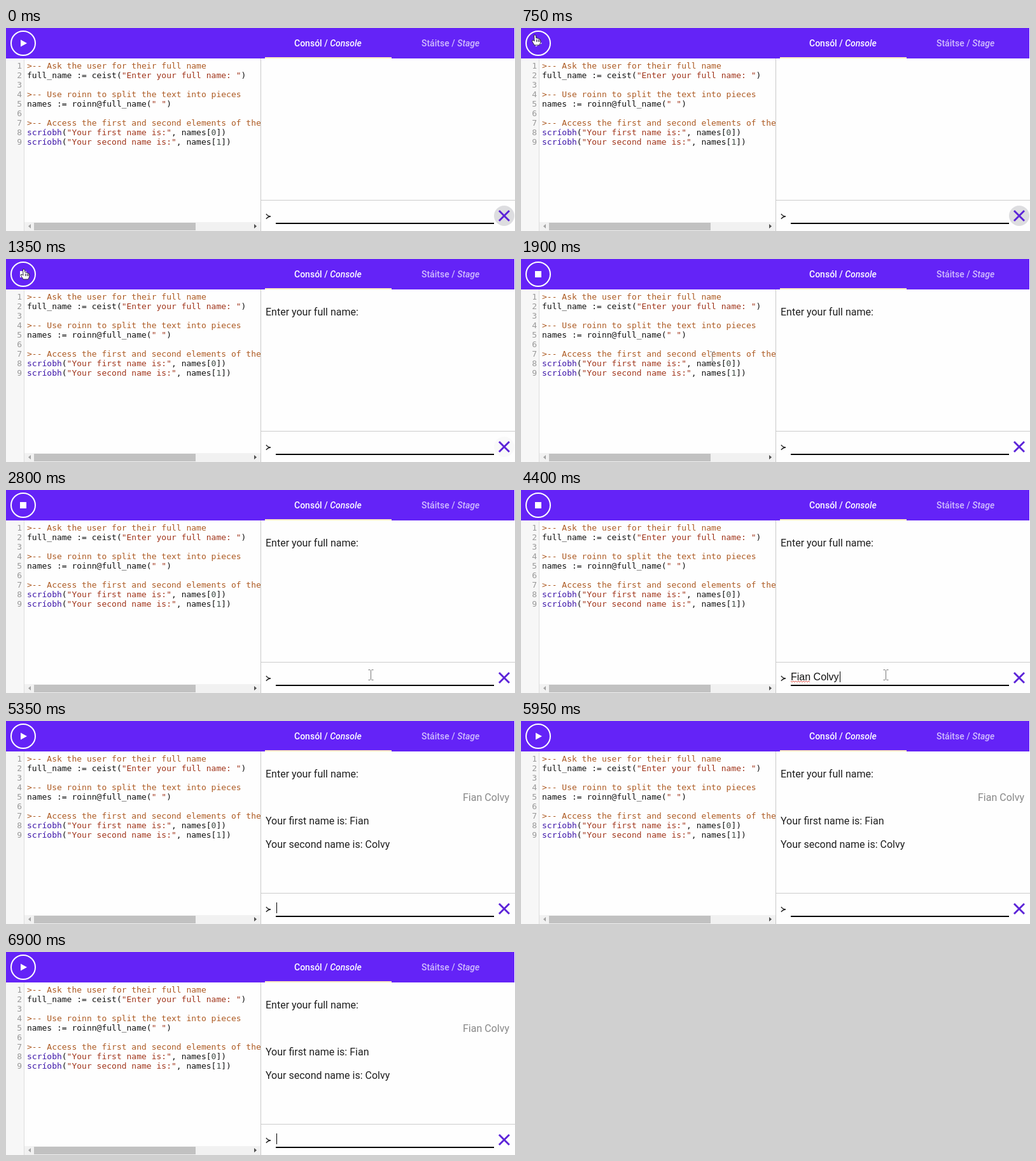
An HTML page with a canvas for the animation above (7150 ms loop, 800x320 px).

```html
<!DOCTYPE html>
<html lang="en">
<head>
<meta charset="utf-8">
<title>Console demo</title>
<style>
html, body { margin: 0; width: 100%; height: 100%; overflow: hidden; background: #fff; }
canvas { display: block; }
</style>
</head>
<body>
<canvas id="stage" width="800" height="320"></canvas>
<script>
const ctx = document.getElementById('stage').getContext('2d');
const LOOP = 7150, TICK = 50;
const HEADER = 48;
const PURPLE = '#6423f7';
const MONO = '13px "DejaVu Sans Mono", monospace';
const ROBOTO = '16px Roboto, sans-serif';
const TAB = '500 14px Roboto, sans-serif';
const ARIAL = '16px "Liberation Sans", Arial, sans-serif';

const FIRST = 'Fian', SECOND = 'Colvy', FULL = FIRST + ' ' + SECOND;
const CODE = [
  '>-- Ask the user for their full name',
  'full_name := ceist("Enter your full name: ")',
  '',
  '>-- Use roinn to split the text into pieces',
  'names := roinn@full_name(" ")',
  '',
  '>-- Access the first and second elements of the list',
  'scríobh("Your first name is:", names[0])',
  'scríobh("Your second name is:", names[1])'
];
const TOKEN = /(>--.*)|("[^"]*")|(scríobh)|(\d+)|[^">\ds]+|./g;
const TOKEN_COLORS = ['#ad5a22', '#a0341a', '#3c14a8', '#3f4a44'];

// Time of each key press, in order
const KEYS = [3550, 3650, 3650, 3750, 3850, 3900, 3950, 4100, 4200, 4300];
const RUN = 1200, ASK = 1300, FOCUS = 2900, ENTER = 4900, DONE = 5000;

function rect(x, y, w, h, color) {
  ctx.fillStyle = color;
  ctx.fillRect(x, y, w, h);
}

function text(str, x, y, font, color, align = 'left') {
  ctx.font = font;
  ctx.fillStyle = color;
  ctx.textAlign = align;
  ctx.fillText(str, x, y);
  return x + ctx.measureText(str).width;
}

function shape(points, fill, stroke, width = 1) {
  ctx.beginPath();
  points.forEach(([x, y]) => ctx.lineTo(x, y));
  ctx.closePath();
  if (fill) { ctx.fillStyle = fill; ctx.fill(); }
  if (stroke) { ctx.strokeStyle = stroke; ctx.lineWidth = width; ctx.stroke(); }
}

function progress(t, from, to) {
  const p = Math.min(1, Math.max(0, (t - from) / (to - from)));
  return p * p * (3 - 2 * p);
}

const mix = (a, b, p) => a + (b - a) * p;

function drawEditor() {
  rect(0, HEADER, 28, 320 - HEADER, '#f7f7f7');
  rect(28, HEADER, 1, 320 - HEADER, '#dddddd');
  ctx.save();
  ctx.beginPath();
  ctx.rect(0, HEADER, 400, 320 - HEADER);
  ctx.clip();
  CODE.forEach((line, i) => {
    const y = 64 + i * 15;
    text(String(i + 1), 25, y, MONO, '#999999', 'right');
    let x = 33;
    for (const match of line.matchAll(TOKEN)) {
      const kind = match.slice(1).findIndex(Boolean);
      x = text(match[0], x, y, MONO, TOKEN_COLORS[kind] || '#111111');
    }
  });
  ctx.restore();

  rect(29, 306, 371, 14, '#f1f1f1');
  rect(44, 307, 254, 12, '#c1c1c1');
  shape([[39, 309], [39, 316], [35, 312.5]], '#a3a3a3');
  shape([[390, 309], [390, 316], [394, 312.5]], '#505050');
}

function drawHeader(running) {
  rect(0, 0, 799, HEADER, PURPLE);
  ctx.beginPath();
  ctx.arc(27, 24, 19, 0, Math.PI * 2);
  ctx.strokeStyle = '#ffffff';
  ctx.lineWidth = 2;
  ctx.stroke();
  if (running) rect(22, 19, 10, 10, '#ffffff');
  else shape([[23, 18.5], [33, 24], [23, 29.5]], '#ffffff');

  let x = text('Consól / ', 453, 29, TAB, '#ffffff');
  text('Console', x, 29, 'italic ' + TAB, '#ffffff');
  x = text('Stáitse / ', 653, 29, TAB, '#d0bdfd');
  text('Stage', x, 29, 'italic ' + TAB, '#d0bdfd');
  rect(407, 46, 199, 2, '#ffe9c0');
}

function drawSquiggle(from, to) {
  ctx.beginPath();
  for (let x = from; x <= to; x += 2) ctx.lineTo(x, 302 + ((x - from) % 4 ? 1 : -1));
  ctx.strokeStyle = '#e0564a';
  ctx.lineWidth = 1;
  ctx.stroke();
}

function caretVisible(t) {
  return (t >= FOCUS && t < 3400) || (t >= 3550 && t < ENTER) ||
    (t >= 5350 && t < 5900) || t >= 6550;
}

function drawConsole(t) {
  rect(400, HEADER, 1, 320 - HEADER, '#c8c8c8');
  rect(401, 271, 399, 1, '#cccccc');
  const say = (str, row) => text(str, 408, 88.5 + row * 37, ROBOTO, '#1f1f1f');
  if (t >= ASK) say('Enter your full name:', 0);
  if (t >= ENTER) text(FULL, 791, 125.5, ROBOTO, '#888888', 'right');
  if (t >= DONE) {
    say('Your first name is: ' + FIRST, 2);
    say('Your second name is: ' + SECOND, 3);
  }

  // Prompt and input line
  ctx.beginPath();
  ctx.moveTo(409, 293);
  ctx.quadraticCurveTo(411, 296.5, 416, 297);
  ctx.quadraticCurveTo(411, 297.5, 409, 301);
  ctx.strokeStyle = '#222222';
  ctx.lineWidth = 1.5;
  ctx.stroke();
  rect(424, 307, 343, 2, '#000000');

  const typed = t < ENTER ? FULL.slice(0, KEYS.filter(k => k <= t).length) : '';
  const end = text(typed, 424, 300, ARIAL, '#111111');
  if (typed.length > FIRST.length) {
    drawSquiggle(424, 424 + ctx.measureText(FIRST).width);
  }
  if (caretVisible(t)) rect(Math.round(end) + 1, 286, 1, 17, '#000000');

  // Clear button, focused until the program is started
  ctx.globalAlpha = 1 - progress(t, RUN, 1400);
  ctx.beginPath();
  ctx.arc(783, 296, 16, 0, Math.PI * 2);
  ctx.fillStyle = '#dddde0';
  ctx.fill();
  ctx.globalAlpha = 1;
  ctx.beginPath();
  for (const s of [-1, 1]) {
    ctx.moveTo(775, 296 - 8 * s);
    ctx.lineTo(791, 296 + 8 * s);
  }
  ctx.strokeStyle = '#5b23d8';
  ctx.lineWidth = 2.9;
  ctx.stroke();
}

function drawHand() {
  shape([[-1.5, 0], [1, 0], [2, 5], [4, 5], [6, 6], [8.5, 7], [9, 11], [7, 16],
    [-1, 16], [-4, 11], [-4.5, 8.5], [-2.5, 8.5], [-1, 10]], '#ffffff', '#2b2340');
  for (const x of [2, 4.5, 6.5]) rect(x, 7, 1, 4, '#2b2340');
}

function drawArrow() {
  shape([[0, 0], [0, 15], [3.5, 12], [6, 17], [8, 16], [6, 11], [10.5, 11]],
    '#111111', '#ffffff');
}

function drawIBeam() {
  rect(-0.5, -7, 1, 15, '#777777');
  for (const y of [-8, 8]) {
    rect(-4, y, 3, 1, '#777777');
    rect(1, y, 3, 1, '#777777');
  }
}

function drawPointer(t) {
  if (t < 350 || t >= DONE) return;
  const enter = progress(t, 300, 750);
  const settle = progress(t, 850, 1200);
  const cross = progress(t, 1600, 2200);
  const x = mix(mix(mix(40, 22, enter), 28, settle), 573.5, cross);
  const y = mix(mix(mix(-20, 11, enter), 16, settle), 291, cross);
  ctx.save();
  ctx.translate(x, y);
  if (Math.hypot(x - 27, y - 24) < 20) drawHand();
  else if (y < HEADER || (x > 400 && y < 272)) drawArrow();
  else drawIBeam();
  ctx.restore();
}

function render(now) {
  const t = Math.floor((now % LOOP) / TICK) * TICK;
  rect(0, 0, 800, 320, '#fefefe');
  drawEditor();
  drawConsole(t);
  drawHeader(t >= RUN && t < DONE);
  drawPointer(t);
}

const start = performance.now();
function loop() {
  render(performance.now() - start);
  requestAnimationFrame(loop);
}
loop();
</script>
</body>
</html>
```
